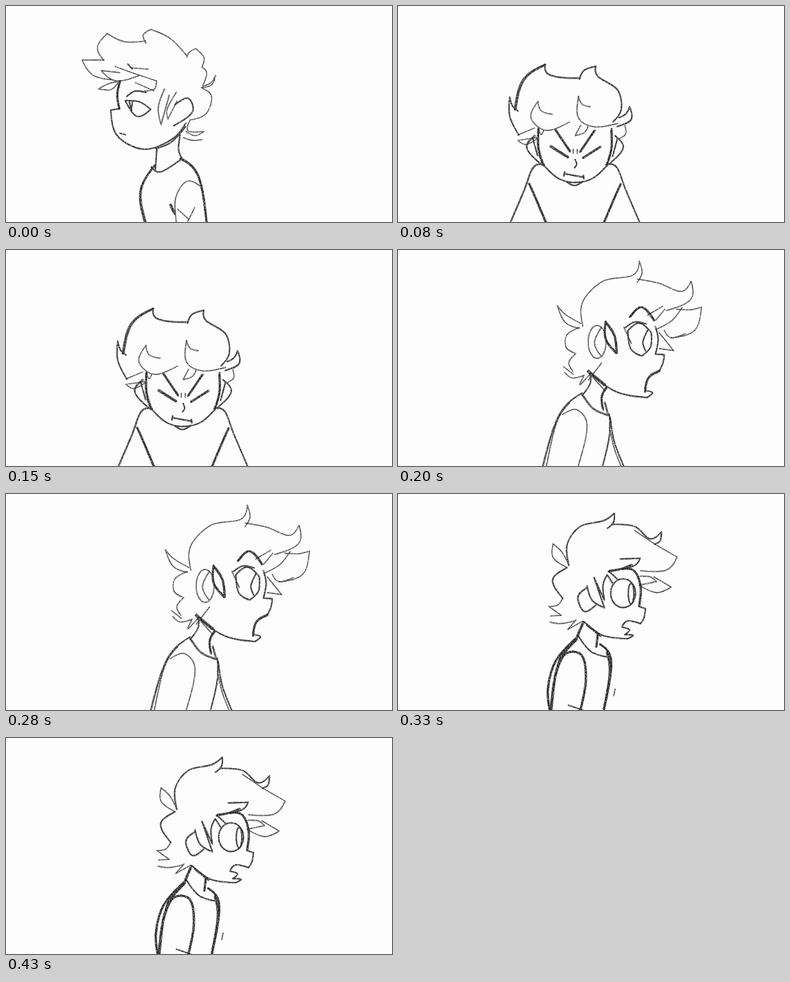
Write an HTML page that moves like this. It is 560x315 px and loops after 0.5 s.

```html
<!DOCTYPE html>
<html lang="en">
<head>
<meta charset="utf-8">
<title>Head turn</title>
<style>
  html, body { margin: 0; width: 100%; height: 100%; overflow: hidden; background: #fdfdfd; }
  svg { display: block; width: 100vw; height: 100vh; }
  path { fill: none; stroke: #222; stroke-linecap: round; stroke-linejoin: round; }
</style>
</head>
<body>
<svg id="stage" viewBox="0 0 560 315">
  <filter id="pencil" filterUnits="userSpaceOnUse" x="0" y="0" width="560" height="315" color-interpolation-filters="sRGB">
    <feTurbulence type="fractalNoise" baseFrequency=".6" numOctaves="2" seed="4" result="noise"/>
    <feColorMatrix in="noise" values="0 0 0 0 0  0 0 0 0 0  0 0 0 0 0  1.8 0 0 0 0" result="grain"/>
    <feGaussianBlur in="SourceGraphic" stdDeviation=".3"/>
    <feComposite in2="grain" operator="in"/>
  </filter>
</svg>
<script>
const pressure = {
  light: { width: 1.4, opacity: .6, spread: .5 },
  firm: { width: 1.9, opacity: .75, spread: .6 },
  bold: { width: 2.9, opacity: .85, spread: 1 }
};
const passes = 2;
const middle = 257;

// Adds the reflection of some strokes about the middle of the face.
const both = half => `${half}; ${half.replace(/(\d+),/g, (_, x) => `${2 * middle - x},`)}`;

// Key points of each stroke: "/" is a sharp corner, ";" lifts the pencil, "o" is an ellipse.
const lookLeft = {
  light: `142,79 133,60 147,40 / 172,52 203,51; 203,54 199,42 210,34 / 238,47 262,72;
    262,75 266,67 275,62 / 287,75 284,89 / 291,98 285,117 / 297,112 304,101 / 298,115 283,119 /
    298,132 290,157 267,166 / 264,182 287,183 / 274,189 261,183; 257,192 270,196 284,195;
    142,79 110,79 / 126,101 155,108; 165,97 138,94 / 160,109 194,101;
    158,88 185,98 218,109 / 215,121 200,124; 180,90 206,92; 188,112 215,124;
    163,110 147,114 134,121 / 152,122 163,111; 230,121 221,148 225,173 / 237,130;
    247,126 234,150 235,165 / 248,139; 283,264 262,256 246,280 247,316; 249,296 265,311; 274,294 264,314`,
  firm: `164,150 152,152 / 162,190 200,209 240,195 261,171; 217,208 240,198 260,176; 175,132 187,124 203,126;
    165,186 173,188; 173,138 194,140 210,151 / 190,161 173,138; 179,139 182,152; 184,140 182,152;
    245,144 264,135 270,155 243,175; 219,208 217,238; 252,188 250,210 257,225; 211,235 225,242 254,224; 177,85 183,92`,
  bold: '165,110 161,130 164,150; 215,233 195,270 202,316; 254,222 280,248 292,316; 239,289 245,302'
};

const scowl = {
  light: `203,139 193,163 215,181 249,169; 203,139 208,153 224,158; 262,132 262,163 285,176 319,171;
    262,132 267,143 279,147; 265,174 257,189 / 270,185 276,175; 203,177 207,187 211,181;
    174,188 198,178; 202,192 174,196 / 186,202 203,193; 329,174 330,187 319,194; 254,209 254,215; 260,209 260,215`,
  firm: `213,85 216,98 235,104 264,105; 263,107 270,94 287,88 / 290,103 318,122 324,150 312,169;
    174,153 166,146 162,133 / 162,161 175,188; 321,163 331,157 336,147 / 338,166 318,176;
    257,224 259,231 256,236; 242,245 269,250; 242,242 241,248; 269,247 270,252;
    211,232 232,251 256,257 282,251 303,232; 245,257 256,262 268,256; `
    + both('199,189 187,207 208,231; 196,193 203,219; 212,231 196,236 183,269 163,316'),
  bold: '170,150 182,107 213,85; ' + both('204,180 204,208 211,232; 229,181 250,212; 221,205 246,221; 191,260 202,285 215,316')
};

const gasp = {
  light: `347,47 354,33 350,16 / 340,37 298,45 268,75 268,111; 347,42 378,48 410,60 425,45 / 424,72 389,88;
    265,107 243,94 231,81 / 242,105 263,114; 263,113 245,124 244,142 258,151 / 248,164 254,177;
    240,170 254,181; 242,179 253,187 270,183 / 264,197 277,183; 404,86 424,87 440,83 / 430,117 396,128;
    412,84 397,103 374,116; 386,117 396,128 417,122; 379,121 400,147 / 379,144; 374,102 387,86; 362,95 384,82;
    328,113 339,137; o 289,134 13,24; 295,113 285,135 294,154; 295,165 276,190; 282,185 299,204;
    238,240 260,233 274,257 261,316; 249,223 230,252 215,316; 307,258 314,289 324,315`,
  firm: `330,113 344,105 360,108; 333,118 350,107 367,121 / 366,142 353,155 / 337,144 333,118;
    362,117 355,134 359,147; 373,112 377,131 373,152 / 386,153 / 384,165 379,176;
    359,205 369,208 361,215 / 315,206 276,177; 276,175 279,193 267,212; 267,210 283,231 305,241 / 300,222;
    267,209 234,241 210,316; 306,239 306,272 296,316; 308,244 314,280 328,316`,
  bold: '337,98 354,84 372,103; 302,105 302,130 317,150; 302,106 314,125 317,150; 379,176 363,186 358,206; 302,200 295,214 297,232; 276,177 300,197'
};

const stare = {
  light: `225,73 225,93 244,107; 225,73 238,85 248,104; 239,152 232,162 219,164 / 237,177 / 221,178;
    221,187 237,189 257,185; 258,184 246,198 / 267,186; 351,120 366,121 375,128 / 350,133;
    371,121 396,136 / 375,144 352,135; 343,53 374,74 / 405,92 / 389,111 352,112; 315,284 313,294`,
  firm: `304,50 313,41 314,28 / 298,39 265,47 246,72 248,104; 310,44 343,47 365,65 382,55 / 380,68 372,73;
    245,107 224,125 239,152; 322,95 351,94 / 340,106 306,112; 274,134 281,155 299,166 / 284,122 / 299,155 /
    297,133 303,118 / 311,130; 306,113 318,124; o 327,145 18,21; o 338,145 4,15;
    275,136 261,150 270,171 287,162; 350,164 359,167 / 357,180 352,189 / 333,185 325,194 / 336,198 329,205 /
    341,206 333,211 / 297,206 271,187; 262,208 280,230 304,238; 244,224 231,252 223,316; 247,308 268,315`,
  bold: `306,113 340,110 352,134 350,163; 339,104 325,110; 269,186 260,207; 290,206 288,223; 275,192 294,207;
    262,207 229,244 218,284 221,316; 260,212 233,249 222,316; 228,268 243,234 267,236 273,272 265,316;
    293,219 309,245 298,316; 303,231 307,262 298,316`
};

const steps = [[80, lookLeft], [120, scowl], [130, gasp], [170, stare]];
const loop = steps.reduce((sum, [hold]) => sum + hold, 0);
const stage = document.getElementById('stage');

let seed = 7;
const wobble = size => {
  seed = seed * 16807 % 2147483647;
  return (seed / 2147483647 - .5) * 2 * size;
};

function add(parent, tag, attributes) {
  const node = document.createElementNS('http://www.w3.org/2000/svg', tag);
  for (const key in attributes) node.setAttribute(key, attributes[key]);
  return parent.appendChild(node);
}

const parse = text => text.trim().split(/\s+/).map(pair => pair.split(',').map(Number));

function ellipse([[cx, cy], [rx, ry]]) {
  const half = dx => `a${rx},${ry} 0 0 1 ${dx},0`;
  return `M${cx - rx},${cy}${half(2 * rx)}${half(-2 * rx)}`;
}

// Catmull-Rom spline whose ends carry on the bend of their neighbours.
function spline(points) {
  const beyond = (a, b, c = b) => a.map((v, k) => 2.5 * v - 2 * b[k] + .5 * c[k]);
  const back = [...points].reverse();
  const chain = [beyond(...points), ...points, beyond(...back)];
  const handle = (i, sign) => chain[i].map((v, k) => v + sign * (chain[i + 1][k] - chain[i - 1][k]) / 6);
  let d = `M${points[0]}`;
  for (let i = 1; i < points.length; i++) d += `C${handle(i, 1)} ${handle(i + 1, -1)} ${points[i]}`;
  return d;
}

function outline(stroke) {
  if (stroke.startsWith('o')) return ellipse(parse(stroke.slice(1)));
  let last = [];
  return stroke.split('/').map(run => {
    const points = [...last, ...parse(run)];
    last = points.slice(-1);
    return spline(points);
  }).join('');
}

function draw(pose) {
  const group = add(stage, 'g', { filter: 'url(#pencil)', display: 'none' });
  for (const [kind, strokes] of Object.entries(pose)) {
    const { width, opacity, spread } = pressure[kind];
    for (const stroke of strokes.split(';')) {
      const d = outline(stroke.trim());
      for (let pass = 0; pass < passes; pass++) {
        const transform = `translate(${wobble(spread)} ${wobble(spread)})`;
        add(group, 'path', { d, transform, opacity, 'stroke-width': width });
      }
    }
  }
  return group;
}

const groups = steps.map(([, pose]) => draw(pose));

function show(time) {
  let rest = time % loop;
  let current = 0;
  while (rest >= steps[current][0]) rest -= steps[current++][0];
  groups.forEach((group, i) => group.setAttribute('display', i === current ? 'inline' : 'none'));
}

const start = performance.now();
function tick() {
  show(performance.now() - start);
  requestAnimationFrame(tick);
}
tick();
</script>
</body>
</html>
```
